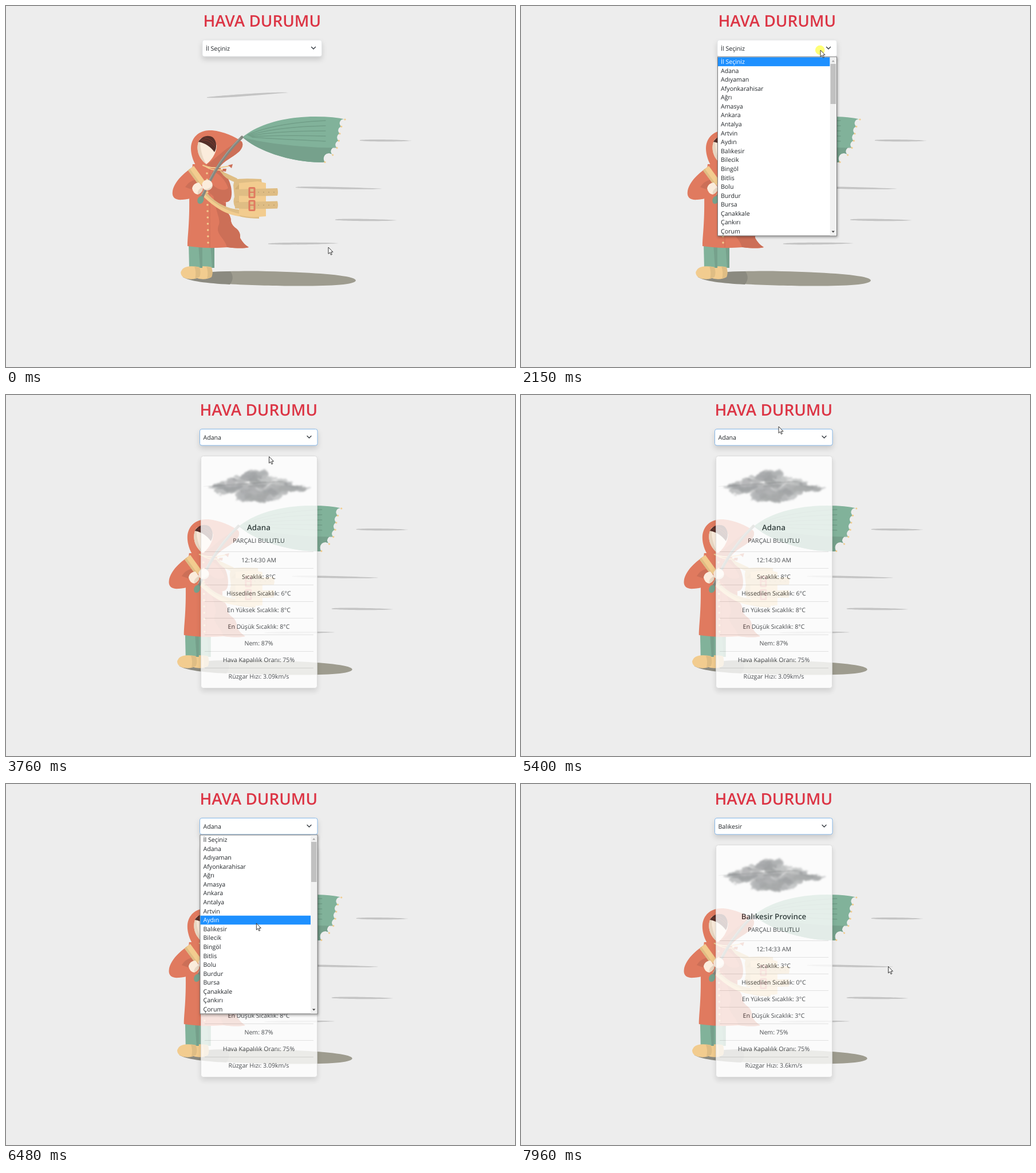
Animation, 889 px wide and 630 px high, one loop 8 s. Source, as an HTML page:

```html
<!DOCTYPE html>
<html lang="tr">
<head>
<meta charset="utf-8">
<title>Hava Durumu</title>
<style>
  html, body { margin: 0; width: 100%; height: 100%; overflow: hidden; background: #ededed; }
  svg { display: block; }
  text { font: 10.6px "Open Sans", "Noto Sans", sans-serif; fill: #212529; text-rendering: geometricPrecision; }
  .title { font-size: 27.8px; font-weight: 560; fill: #dc3545; text-anchor: middle; }
  .raised { filter: drop-shadow(0 5px 5px rgba(0, 0, 0, .15)); }
  .menu { filter: drop-shadow(1px 2px 2px rgba(0, 0, 0, .35)); }
  #card text { text-anchor: middle; }
  #place { font-size: 13.3px; font-weight: 600; }
  .coat { fill: #e07a5f; } .coat2 { fill: #cc6f57; }
  .green { fill: #81b29a; } .green2 { fill: #76a18c; }
  .sand { fill: #f2cc8f; } .sand2 { fill: #dfbd84; }
  .skin { fill: #fbecdc; } .skin2 { fill: #e8d7c3; }
  .wind { fill: #c4c4c4; }
  .line { fill: none; stroke-linecap: round; }
</style>
</head>
<body>
<svg width="889" height="630" viewBox="0 0 889 630">
  <defs>
    <filter id="ragged" x="-20%" y="-30%" width="140%" height="160%" color-interpolation-filters="sRGB">
      <feTurbulence type="fractalNoise" baseFrequency=".05" numOctaves="3" seed="4"/>
      <feDisplacementMap in="SourceGraphic" scale="14" xChannelSelector="R" yChannelSelector="G"/>
      <feGaussianBlur stdDeviation="1.5"/>
    </filter>
    <g id="leg">
      <path class="green" d="M319 415H342L340 457H320Z"/>
      <path class="green2" d="M336 415H343V457H339Z"/>
      <path class="sand" d="M307 461C310 453 330 453 338 456Q341 466 338 473C330 478 314 478 308 472Q303 466 307 461Z"/>
      <path class="sand2" d="M329 454.500L338 456Q341 466 338 473L330 476Q333 465 329 454.500Z"/>
    </g>
    <g id="belt">
      <path class="sand2" d="M399 320L474 318Q476 325 474 331Q435 332 400 331Z"/>
      <path class="line" stroke="#a68d63" stroke-width="1.600" stroke-dasharray="0 9" d="M441 325H470"/>
      <rect class="line" stroke="#e07a5f" stroke-width="3" x="425" y="317.500" width="9" height="16.500" rx="1"/>
      <path class="line" stroke="#e07a5f" stroke-width="2" d="M425 325H433"/>
    </g>
  </defs>

  <g id="scene">
    <g id="gusts" class="wind"></g>

    <path fill="#9e9c8f" d="M309 473C330 464 400 461.500 455 463C540 465 611 470 611 479C610 487 560 489 500 488.500C430 488 335 485 309 473Z"/>
    <path fill="#8b8a80" d="M309 473C330 466 360 463 392 463Q400 475 391 486C350 484 320 480 309 473Z"/>

    <use href="#leg" transform="translate(711 0) scale(-1 1) translate(35 0)" style="display:none"/>
    <use href="#leg" x="21"/>
    <use href="#leg"/>

    <path class="coat" d="M326 276H372C383 300 385 330 384 358Q393 365 393 376Q395 384 403 389Q410 395 409 405Q415 416 424 421Q412 424 388 421Q350 424 317 419C317 400 321 380 320 330Z"/>
    <path class="coat2" d="M362 330L384 345V358Q393 365 393 376Q395 384 403 389Q410 395 409 405Q415 416 424 421Q412 424 386 421C382 404 364 398 372 381C375 372 366 358 362 330Z"/>
    <path class="line" stroke="#cc6f57" d="M356 285V421"/>
    <path class="coat2" d="M370 282C386 290 395 312 394 329C393 342 387 344 378 341C366 337 356 328 350 318L360 290Z"/>
    <path class="coat" d="M364 290C376 294 386 310 388 318C378 325 365 318 358 308Z"/>
    <path class="coat" d="M330 278C311 291 294 306 291 323C289 335 297 339 308 338C322 337 334 333 341 326L346 296Z"/>
    <path class="coat2" d="M313 316Q319 306 331 303L335 311L324 320Z"/>
    <path class="line" stroke="#f2cc8f" stroke-width="3.600" stroke-dasharray="0 11" d="M351 292L353 414"/>

    <path class="sand2" d="M372 286L404 301L402 308Q388 304 380 296Z"/>
    <path class="sand2" d="M346 320C360 339 381 353 405 355L442 366V371C400 371 370 356 344 325Z"/>
    <path class="sand" d="M344 325C360 343 384 358 410 363L407 367C382 364 360 348 341 329Z"/>
    <path class="sand2" d="M399 303Q410 300 446 302L447 310L408 313L407 352L399 349Q396 340 399 333L397 313Z"/>
    <path class="sand" d="M407 309L440 306L454 309V367Q425 370 407 365Z"/>
    <path fill="#d2af76" d="M407 311L400 319L407 324ZM407 352L400 342L407 341Z"/>
    <use href="#belt"/>
    <use href="#belt" y="22.500"/>

    <path class="coat" d="M334 282C325 269 320 250 325 237C331 221 346 216 360 217C380 219 400 228 411 236C416 241 412 250 406 255C395 265 380 270 372 283Z"/>
    <path class="coat2" d="M411 236C392 240 377 257 351 277L352 282H372C380 270 395 265 406 255C412 250 416 241 411 236Z"/>
    <path class="skin" d="M339 232C331 243 333 264 350 276C359 269 367 258 368 244C365 230 350 225 339 232Z"/>
    <path class="skin2" d="M339 232C331 243 333 264 350 276Q339 259 339 232Z"/>
    <path fill="#56302a" d="M336 237C341 228 352 224 361 229C368 235 369 247 364 255C358 246 348 239 336 237Z"/>
    <path class="line" stroke="#883d30" stroke-width=".9" d="M342 234Q355 232 365 246M347 230Q359 231 366 243"/>
    <path class="line" stroke="#f2cc8f" stroke-width="2" d="M344 278Q360 286 390 279M350 281Q363 289 381 285"/>
    <path class="coat2" d="M388 278L396 276L394 283ZM379 284L385 284L384 289L378 288Z"/>

    <path class="sand" d="M318 287L328 279L349 308L338 314Z"/>
    <path class="sand2" d="M318 287L321 284L341 312L338 314Z"/>

    <path id="canopy" class="green"/>
    <path id="shade" class="green2"/>
    <g id="folds" class="line" stroke="#719e88" stroke-width="1.500"></g>
    <g id="tips" class="sand"></g>

    <path class="line" stroke="#85877f" stroke-width="5" d="M412 229C386 254 363 285 343 333"/>
    <path class="line" stroke="#a2a39a" stroke-width="1.400" d="M409 230C384 255 361 286 343 328"/>
    <ellipse class="green2" cx="340" cy="338.500" rx="5.300" ry="7" transform="rotate(22 340 338)"/>
    <path class="skin" d="M325 318Q327 309 337 308L344 317Q343 326 335 329Q327 328 325 318Z"/>
    <path class="skin2" d="M335 329Q333 320 344 316L343 323Z"/>
    <circle class="skin" cx="351.500" cy="312.500" r="9.300"/>
    <path class="skin2" d="M346 319Q352 322 361 313Q359 321 351 322Z"/>
  </g>

  <text id="title" class="title" y="35.700">HAVA DURUMU</text>

  <g id="card" opacity=".8">
    <rect class="raised" x="340.500" y="106.500" width="203" height="405" rx="4" fill="#fff" stroke="#d9d9d9"/>
    <g id="cloud" filter="url(#ragged)">
      <ellipse cx="441" cy="162" rx="90" ry="5" fill="#c2c4c5"/>
    </g>
    <text id="place" x="441.500" y="236"></text>
    <g id="facts" stroke-opacity=".125"></g>
  </g>

  <rect id="field" class="raised" y="59.500" height="28.500" rx="3.500" fill="#fff"/>
  <text id="choice" y="78"></text>
  <path id="chevron" class="line" d="M-3.500 -1.700L0 1.800L3.500 -1.700" stroke="#343a40" stroke-width="1.400"/>

  <g id="menu">
    <rect id="sheet" class="menu" x=".5" y="89" height="312" fill="#fff" stroke="#7b7b7b"/>
    <rect id="mark" x="1" height="15.600" fill="#1e90ff"/>
    <g id="options"></g>
    <g id="bar">
      <rect y="89.500" width="11" height="311" fill="#f1f1f1"/>
      <rect x=".8" y="101" width="9.500" height="70" fill="#c1c1c1"/>
      <path d="M3 97.500L5.500 94.500L8 97.500Z" fill="#a3a3a3"/>
      <path d="M2.800 392.500L5.500 395.500L8.200 392.500Z" fill="#404040"/>
    </g>
  </g>

  <circle id="halo" r="8.300" cx="-.8" fill="#ffff2e" opacity=".65"/>
  <path id="pointer" d="M0 0V11.500L2.600 9L4.500 13.300L6.300 12.500L4.500 8.300H8Z" fill="#fff" stroke="#222" stroke-width=".9"/>
</svg>

<script>
const LOOP = 8000, STEP = 70, ROW = 15.58, TOP = 89.5;
const $ = id => document.getElementById(id);
const set = (node, attrs) => { for (const k in attrs) node.setAttribute(k, attrs[k]); };
const make = (parent, tag, attrs, text = '') => {
  const node = document.createElementNS('http://www.w3.org/2000/svg', tag);
  set(node, attrs);
  node.textContent = text;
  return parent.appendChild(node);
};
const show = (node, on) => { node.style.display = on ? '' : 'none'; };
const within = (spans, t) => spans.some(([a, b]) => t >= a && t < b);
const times = (n, fn) => Array.from({ length: n }, (_, i) => fn(i));
let seed = 7;
const random = () => (seed = seed * 16807 % 2147483647) / 2147483647;

// Wind streaks: x, y, length, slope
for (const [x, y, w, dy] of [[351, 159, 143, -8], [618, 234, 91, 1], [506, 316, 151, 3],
  [575, 372.5, 108, 1.5], [458, 414.5, 123, -.5]])
  make($('gusts'), 'path', { d: `M${x} ${y}c${w * .1} -2 ${w * .8} ${dy - 2} ${w} ${dy}` +
    `c${-w * .2} 2 ${-w * .8} ${3 - dy} ${-w} ${1 - dy}Z` });

// Scalloped edge of the canopy
const tips = times(7, i => {
  const u = i - 3;
  return [581.25 - 2.083 * u - .75 * u ** 2 - .417 * u ** 3, 198 + 12.4 * i];
});
const scallops = from => tips.slice(from).map(p => `A7 7 0 0 0 ${p}`).join('');
const underside = 'C512 275 446 258 413 229Z';
set($('canopy'), { d: `M413 229C442 205 490 193 540 193Q575 193 ${tips[0]}${scallops(1)}${underside}` });
set($('shade'), { d: `M413 229C450 240 520 247 ${tips[4]}${scallops(5)}${underside}` });
for (const [cx, cy] of tips) make($('tips'), 'circle', { cx, cy, r: 1.6 });
times(5, i => make($('folds'), 'path',
  { d: `M${422 + i * 2} ${225 + i}Q470 ${204 + i * 7} 558 ${200 + i * 9}` }));

// Cloud: puffs gathered towards the middle
times(75, () => {
  const u = random() + random() - 1;
  const lift = 29 * (1 - Math.abs(u)) ** 1.2;
  make($('cloud'), 'ellipse', {
    cx: 439 + 84 * u, cy: 160 + lift * (random() * 2 - 1),
    rx: 7 + 14 * random(), ry: 2.5 + 4 * random(),
    fill: `hsl(200, 2%, ${52 + 18 * random()}%)`, opacity: .65
  });
});

const cities = ['İl Seçiniz', 'Adana', 'Adıyaman', 'Afyonkarahisar', 'Ağrı', 'Amasya', 'Ankara',
  'Antalya', 'Artvin', 'Aydın', 'Balıkesir', 'Bilecik', 'Bingöl', 'Bitlis', 'Bolu', 'Burdur',
  'Bursa', 'Çanakkale', 'Çankırı', 'Çorum'];
const options = cities.map((name, i) =>
  make($('options'), 'text', { x: 6, y: 101 + i * ROW }, name));

const report = (clock, now, feel, wet, wind) => ['PARÇALI BULUTLU', clock, `Sıcaklık: ${now}°C`,
  `Hissedilen Sıcaklık: ${feel}°C`, `En Yüksek Sıcaklık: ${now}°C`, `En Düşük Sıcaklık: ${now}°C`,
  `Nem: ${wet}%`, 'Hava Kapalılık Oranı: 75%', `Rüzgar Hızı: ${wind}km/s`];
const first = report('12:14:30 AM', 8, 6, 87, 3.09);
const second = report('12:14:33 AM', 3, 0, 75, 3.6);
const facts = first.map((_, i) => {
  if (i) make($('facts'), 'path', { d: `M347 ${244.5 + i * 29}H537`, stroke: '#000' });
  return make($('facts'), 'text', { x: 441.5, y: i ? 263 + i * 29 : 258 });
});

// Pointer strokes: start, end, target x and y, sideways bow
const home = [563, 421];
const strokes = [[1160, 2070, 523, 77, -70], [2150, 2700, 459.5, 107.5, 0], [4480, 5040, 500, 73, 32],
  [5190, 5400, 450, 55, 0], [5530, 6010, 485, 72, 0], [6130, 6550, 436, 248, 0],
  [7470, 7960, 641.5, 318.5, 0]];
const clicks = [[2070, 2290], [3030, 3100], [6080, 6290], [7010, 7080]];
const opened = [[2150, 3100], [6150, 7080]];

function pointerAt(t) {
  let [x, y] = home;
  for (const [start, end, toX, toY, bow] of strokes) {
    if (t < start) break;
    const u = Math.min(1, Math.floor((t - start) / STEP) * STEP / (end - start));
    const eased = 1 - (1 - u) ** 2;
    x += (toX - x) * eased + bow * Math.sin(Math.PI * eased);
    y += (toY - y) * eased;
  }
  return [x, y];
}

function draw(t) {
  const loaded = t >= 3760;
  const left = loaded ? 338.5 : 343, width = loaded ? 205.5 : 208.5;
  const chosen = t < 3100 ? 0 : t < 7080 ? 1 : 10;
  const [x, y] = pointerAt(t);
  const spot = `translate(${x} ${y})`;

  set($('scene'), { transform: `translate(${loaded ? -6.2 : 0} 0)` });
  set($('title'), { x: loaded ? 441.3 : 447.3 });
  set($('field'), { x: left, width, stroke: t >= 2220 ? '#86b7e8' : '#e4e6e8' });
  set($('choice'), { x: left + 6 });
  $('choice').textContent = cities[chosen];
  set($('chevron'), { transform: `translate(${loaded ? 529.5 : 537} 73.3)` });

  show($('card'), loaded);
  const fresh = t >= 7210;
  $('place').textContent = fresh ? 'Balıkesir Province' : 'Adana';
  facts.forEach((node, i) => { node.textContent = (fresh ? second : first)[i]; });

  show($('menu'), within(opened, t));
  set($('menu'), { transform: `translate(${left} 0)` });
  set($('sheet'), { width: width - .5 });
  set($('bar'), { transform: `translate(${width - 11.8} 0)` });
  const row = y < TOP ? chosen : Math.min(cities.length - 1, Math.floor((y - TOP) / ROW));
  set($('mark'), { y: TOP + row * ROW, width: width - 13 });
  options.forEach((node, i) => { node.style.fill = i === row ? '#fff' : ''; });

  show($('halo'), within(clicks, t));
  set($('halo'), { transform: spot });
  set($('pointer'), { transform: spot });
}

const begin = performance.now();
function tick() {
  draw((performance.now() - begin) % LOOP);
  requestAnimationFrame(tick);
}
tick();
</script>
</body>
</html>
```
